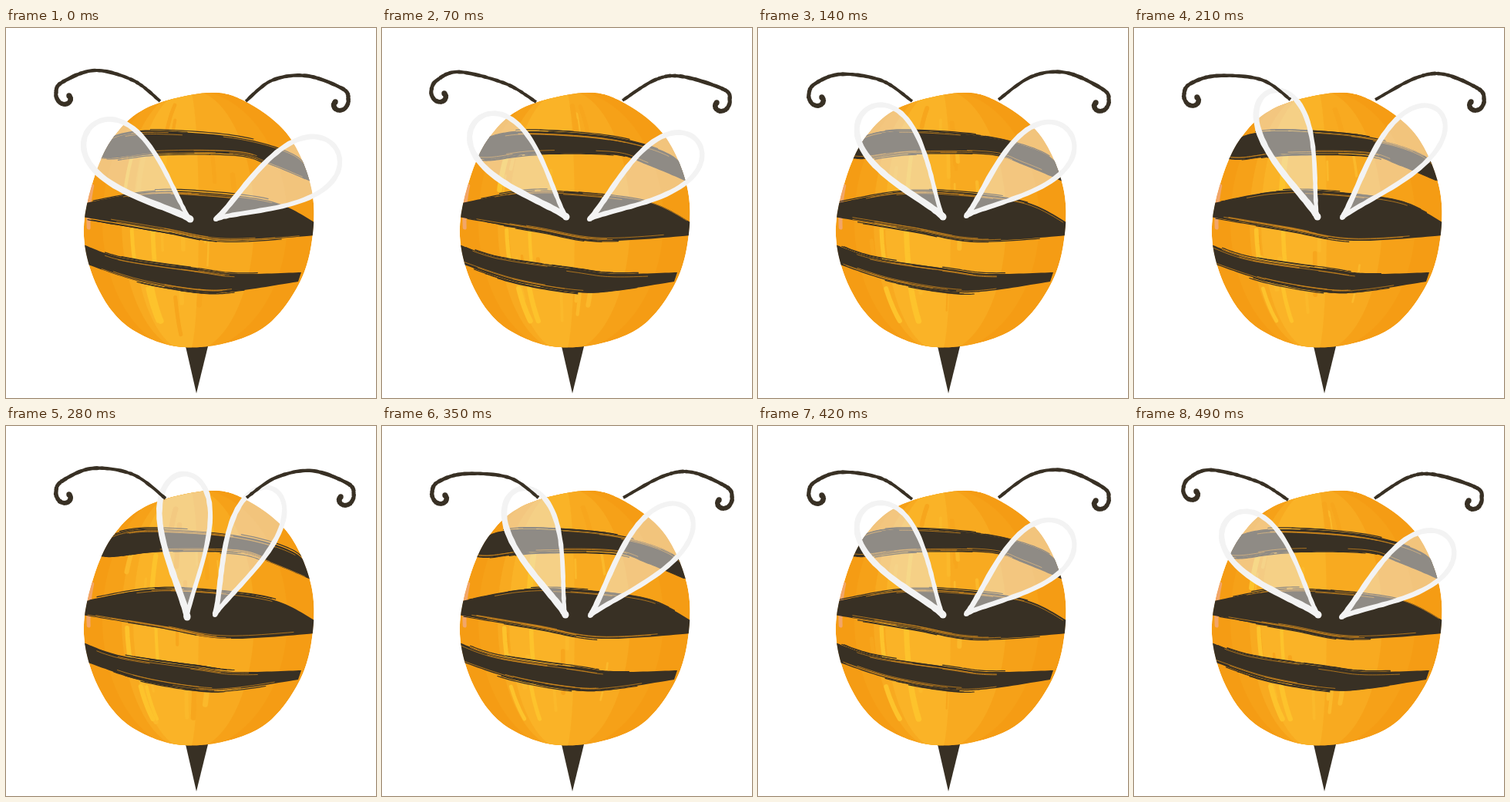
Animation of 480x480 px, one loop 560 ms. Source, as an HTML page:

```html
<!DOCTYPE html>
<html lang="en">
<head>
<meta charset="utf-8">
<title>Bee</title>
<style>
html, body { margin: 0; width: 100%; height: 100%; overflow: hidden; background: #fff; }
svg { display: block; width: 100vw; height: 100vh; }
/* wings go up and back down: 0 1 2 3 4 3 2 1 */
.pose { opacity: 0; animation: 560ms step-end infinite; }
#pose0 { animation-name: rest; }
#pose1 { animation-name: lift; }
#pose2 { animation-name: half; }
#pose3 { animation-name: high; }
#pose4 { animation-name: peak; }
@keyframes rest { 0% { opacity: 1 } 12.5%, 100% { opacity: 0 } }
@keyframes lift { 0%, 25% { opacity: 0 } 12.5%, 87.5%, 100% { opacity: 1 } }
@keyframes half { 0%, 37.5%, 87.5%, 100% { opacity: 0 } 25%, 75% { opacity: 1 } }
@keyframes high { 0%, 50%, 75%, 100% { opacity: 0 } 37.5%, 62.5% { opacity: 1 } }
@keyframes peak { 0%, 62.5%, 100% { opacity: 0 } 50% { opacity: 1 } }
</style>
</head>
<body>
<svg id="stage" viewBox="0 0 480 480"></svg>
<script>
const DARK = '#383024', WHITE = '#f3f3f3';
const stage = document.getElementById('stage');

let seed = 1;
function rand(a, b) {
  seed = (seed * 16807) % 2147483647;
  return a + (b - a) * seed / 2147483647;
}
const mix = (a, b, u) => a + (b - a) * u;
const parse = text => text.split(' ').map(p => p.split(',').map(Number));

// Catmull-Rom curve through key points
function spline(a, b, c, d, t) {
  const cubic = 3 * (b - c) + d - a;
  const square = 2 * a - 5 * b + 4 * c - d;
  return b + 0.5 * t * (c - a + t * (square + t * cubic));
}
function smooth(points, closed = false) {
  const n = points.length, out = [];
  const at = i => points[closed ? (i + n) % n : Math.max(0, Math.min(n - 1, i))];
  for (let i = 0; i < (closed ? n : n - 1); i++) {
    const [a, b, c, d] = [at(i - 1), at(i), at(i + 1), at(i + 2)];
    for (let k = 0; k < 16; k++) {
      out.push([0, 1].map(axis => spline(a[axis], b[axis], c[axis], d[axis], k / 16)));
    }
  }
  if (!closed) out.push(points[n - 1]);
  return out;
}

const path = points => 'M' + points.map(p => p.map(v => v.toFixed(1)).join(' ')).join('L');
const fill = (points, color, extra = '') => `<path d="${path(points)}Z" fill="${color}" ${extra}/>`;
const stroke = (points, color, width) =>
  `<path d="${path(points)}" fill="none" stroke="${color}" stroke-width="${width}" stroke-linecap="round"/>`;

// Brush line that goes from one width to another with a slight wobble
function brush(points, from, to, color) {
  const left = [], right = [], last = points.length - 1;
  points.forEach(([x, y], i) => {
    const a = points[Math.max(0, i - 1)], b = points[Math.min(last, i + 1)];
    const len = Math.hypot(b[0] - a[0], b[1] - a[1]) || 1;
    const r = (mix(from, to, i / last) + rand(-0.5, 0.5)) / 2;
    const dx = (a[1] - b[1]) / len * r, dy = (b[0] - a[0]) / len * r;
    left.push([x + dx, y + dy]);
    right.unshift([x - dx, y - dy]);
  });
  const [x, y] = points[last];
  return fill([...left, ...right], color) + `<circle cx="${x}" cy="${y}" r="${to / 2}" fill="${color}"/>`;
}

const body = smooth(parse('262,84 312,96 366,139 396,207 397,275 379,334 338,386 280,410 215,412 155,385 118,335 101,270 111,205 137,145 182,104'), true);
const stripes = [
  ['116,153 150,138 200,134 300,142 372,163 402,194', '116,168 140,170 200,163 300,164 345,178 402,202'],
  ['98,228 180,213 250,213 345,225 402,253', '98,245 200,262 285,276 402,269'],
  ['98,280 150,298 250,313 300,319 383,317', '98,304 170,328 250,342 300,341 379,329']
].map(edges => edges.map(edge => smooth(parse(edge))));

// Vertical line bent around the round body, bulging out to x
function meridian(x, from, to) {
  const points = [];
  for (let y = from; y <= to; y += 6) {
    points.push([mix(238, x, Math.sqrt(Math.max(0, 1 - ((y - 250) / 170) ** 2))), y]);
  }
  return points;
}
const band = (a, b, color) => fill([...meridian(a, 82, 418), ...meridian(b, 82, 418).reverse()], color);

function stripe([top, bottom]) {
  let art = fill([...top, ...[...bottom].reverse()], DARK);
  for (let i = 0; i < 18; i++) {
    const edge = i % 2 ? top : bottom, inward = i % 2 ? 1 : -1;
    const start = Math.floor(rand(2, edge.length - 30)), shift = rand(-2.5, 4);
    const hair = edge.slice(start, start + rand(14, 30)).map(([x, y]) => [x, y + shift * inward]);
    art += shift > 0.5 ? stroke(hair, '#d98d1c', 0.7) : stroke(hair, DARK, 1.2);
  }
  return art;
}

function torso() {
  let art = fill(body, '#f59c14') + band(125, 365, '#f6a118') + band(150, 322, '#f8aa20') + band(165, 250, '#fab327');
  for (let i = 0; i < 16; i++) {
    const y = rand(100, 350);
    art += stroke(meridian(rand(145, 300), y, y + rand(20, 60)), i % 3 ? '#fbb92b' : '#f7a61d', rand(2, 7));
  }
  for (const y of [168, 262, 262, 338, 338]) {
    art += stroke(meridian(rand(150, 195), y, y + 42), '#fdc32c', rand(4, 8));
  }
  art += stroke(meridian(107, 205, 262), '#f2a668', 5);
  return art + stripes.map(stripe).join('');
}

// Teardrop from its root; the angle is in degrees from upright
function wing(x, y, angle, length, halfWidth) {
  const a = angle * Math.PI / 180, side = -Math.sign(angle), points = [];
  for (let i = 0; i <= 80; i++) {
    const h = Math.PI * i / 80, sin = Math.sin(h);
    const along = length * sin ** 2;
    const across = side * halfWidth * 2.9 * sin ** 2.6 * Math.cos(h);
    points.push([x + along * Math.sin(a) + across * Math.cos(a), y - along * Math.cos(a) + across * Math.sin(a)]);
  }
  return points;
}

// Root, shoulder and crest, then a spiral around the last point
function feeler(text, turn) {
  const points = parse(text), [cx, cy] = points.pop();
  for (let i = 0; i <= 6; i++) {
    const u = i / 6, r = 5 + 5 * (1 - u) + 11 * (1 - u) ** 4;
    const a = mix(-1.85, -7, u);
    points.push([cx + turn * r * Math.cos(a), cy + r * Math.sin(a)]);
  }
  return smooth(points);
}

function pose(id, { left, right, feelers }) {
  seed = 71 + id * 977;
  const wings = [wing(...left), wing(...right)];
  stage.insertAdjacentHTML('beforeend', `<g class="pose" id="pose${id}">
    ${fill(parse('233,413 262,413 247,474'), DARK)}
    <g clip-path="url(#round)">${torso()}${wings.map(w => fill(w, '#eee', 'opacity=".48"')).join('')}</g>
    ${brush(wings[0], 5, 9, WHITE)}${brush(wings[1], 7, 6, WHITE)}
    ${feelers.map((f, i) => brush(feeler(f, i ? -1 : 1), 4, 7, DARK)).join('')}
  </g>`);
}

stage.innerHTML = `<clipPath id="round"><path d="${path(body)}Z"/></clipPath>`;
[
  { left: [239, 248, -47.5, 176, 37], right: [272, 248, 60, 181, 37],
    feelers: ['200,95 165,68 115,55 78,91', '311,95 345,68 390,62 431,99'] },
  { left: [239, 245, -42.4, 171, 35], right: [269, 248, 54.6, 173, 34],
    feelers: ['200,96 160,72 100,57 77,88', '312,94 355,67 390,63 438,100'] },
  { left: [240, 245, -35.2, 171, 35], right: [270, 244, 50.3, 173, 36],
    feelers: ['200,95 160,68 107,60 79,93', '312,93 355,63 400,58 442,100'] },
  { left: [238, 245, -20.7, 174, 32], right: [270, 246, 42, 187, 33],
    feelers: ['203,93 165,67 107,62 78,93', '313,93 365,65 402,60 441,99'] },
  { left: [235, 248, -1.3, 186, 33], right: [271, 245, 24.7, 180, 31],
    feelers: ['207,94 165,63 112,55 78,92', '312,93 350,67 397,58 438,95'] }
].forEach((shape, id) => pose(id, shape));
</script>
</body>
</html>
```
